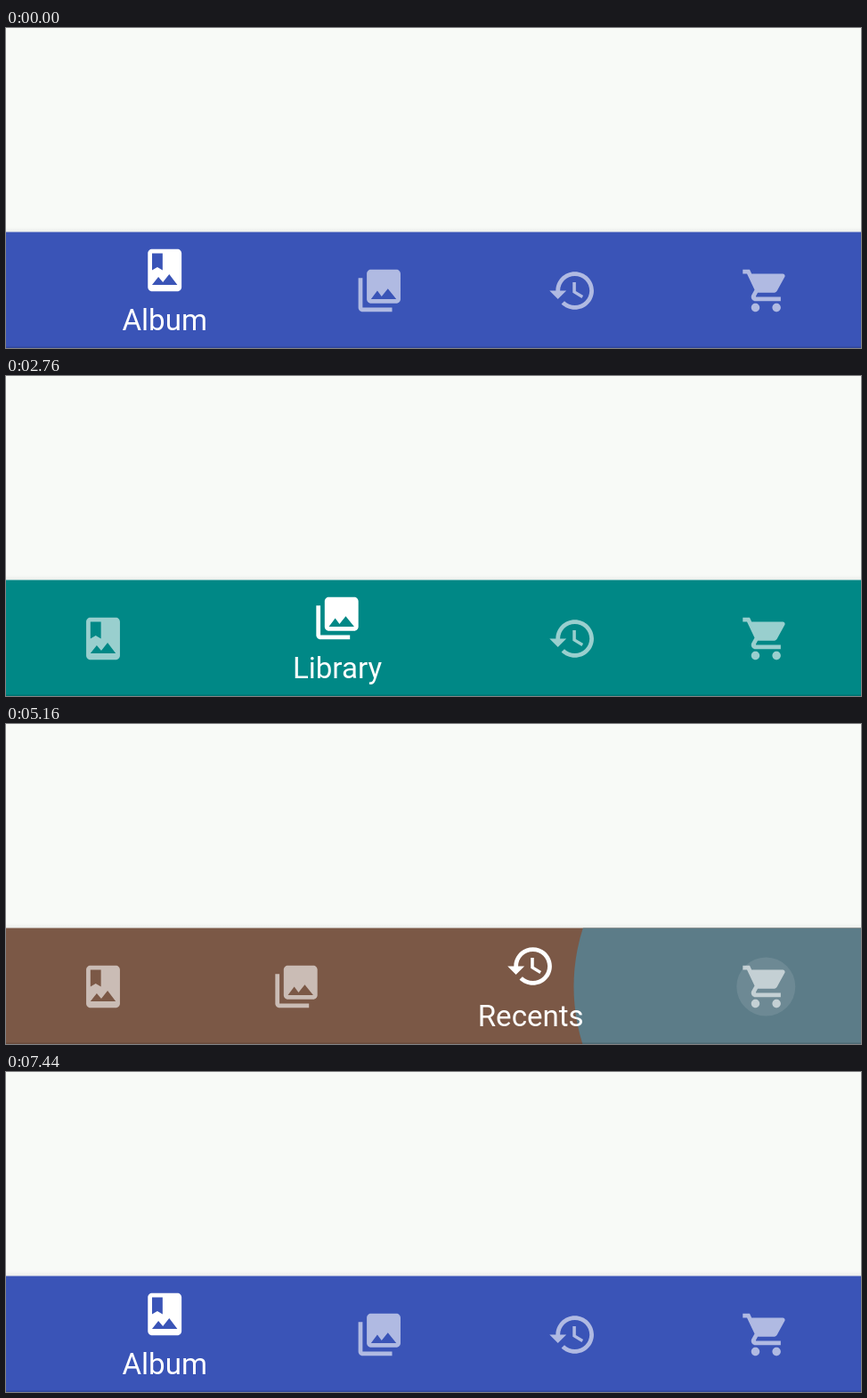
An HTML page that plays this animation: 960x360 px, repeating every 7500 ms.

```html
<!DOCTYPE html>
<html lang="en">
<head>
<meta charset="utf-8">
<title>Bottom navigation</title>
<style>
  html, body { margin: 0; width: 100%; height: 100%; overflow: hidden; background: #f8faf7; }
  svg { display: block; width: 960px; height: 360px; }
  text { font: 33.1px Roboto, Arial, sans-serif; fill: #fff; text-anchor: middle; }
</style>
</head>
<body>
<svg id="stage" viewBox="0 0 960 360">
  <defs>
    <linearGradient id="shade" x1="0" y1="0" x2="0" y2="1">
      <stop offset="0" stop-color="#000" stop-opacity="0"/>
      <stop offset="1" stop-color="#000" stop-opacity=".05"/>
    </linearGradient>
    <clipPath id="barClip"><rect y="229.5" width="960" height="131"/></clipPath>
  </defs>
  <rect width="960" height="360" fill="#f8faf7"/>
  <rect y="224" width="960" height="5.5" fill="url(#shade)"/>
  <g clip-path="url(#barClip)">
    <rect id="bar" y="229" width="960" height="131"/>
    <circle id="reveal" cy="295.5"/>
    <circle id="ripple" cy="295.5" fill="#fff"/>
    <rect y="358.5" width="960" height="1.5" opacity=".15"/>
    <g id="items"></g>
  </g>
</svg>
<script>
const LOOP = 7500;
const REST_Y = 295.5, ACTIVE_Y = 272.5, LABEL_Y = 340;
const ICON_SCALE = 2.367;
const REVEAL_MS = 500, FADE_MS = 108, MOVE_DELAY = 110, MOVE_MS = 380;

const tabs = [
  { label: 'Album', color: '#3a54b7', active: 178.2,
    icon: 'M18 2H6c-1.1 0-2 .9-2 2v16c0 1.1.9 2 2 2h12c1.1 0 2-.9 2-2V4c0-1.1-.9-2-2-2zM6 4h5v8l-2.5-1.5L6 12V4zm0 15l3-3.86 2.14 2.58 3-3.86L18 19H6z' },
  { label: 'Library', color: '#008886', active: 372,
    icon: 'M22 16V4c0-1.1-.9-2-2-2H8c-1.1 0-2 .9-2 2v12c0 1.1.9 2 2 2h12c1.1 0 2-.9 2-2zm-11-4l2.03 2.71L16 11l4 5H8l3-4zM2 6v14c0 1.1.9 2 2 2h14v-2H4V6H2z' },
  { label: 'Recents', color: '#7b5846', active: 589.2,
    icon: 'M13 3c-4.97 0-9 4.03-9 9H1l3.89 3.89.07.14L9 12H6c0-3.87 3.13-7 7-7s7 3.13 7 7-3.13 7-7 7c-1.93 0-3.68-.79-4.94-2.06l-1.42 1.42C8.27 19.99 10.51 21 13 21c4.97 0 9-4.03 9-9s-4.03-9-9-9zm-1 5v5l4.28 2.54.72-1.21-3.5-2.08V8H12z' },
  { label: 'Purchased', color: '#5c7c88', active: 782,
    icon: 'M7 18c-1.1 0-1.99.9-1.99 2S5.9 22 7 22s2-.9 2-2-.9-2-2-2zM1 2v2h2l3.6 7.59-1.35 2.45c-.16.28-.25.61-.25.96 0 1.1.9 2 2 2h12v-2H7.42c-.14 0-.25-.11-.25-.25l.03-.12.9-1.63h7.45c.75 0 1.41-.41 1.75-1.03l3.58-6.49c.08-.14.12-.31.12-.48 0-.55-.45-1-1-1H5.21l-.94-2H1zm16 16c-1.1 0-1.99.9-1.99 2s.89 2 1.99 2 2-.9 2-2-.9-2-2-2z' }
];

const taps = [
  { at: 1480, from: 0, to: 1 },
  { at: 3432, from: 1, to: 2 },
  { at: 5052, from: 2, to: 3 },
  { at: 6860, from: 3, to: 0 }
];
const idle = { at: -LOOP, from: 3, to: 0 };

const byId = id => document.getElementById(id);
const bar = byId('bar'), reveal = byId('reveal'), ripple = byId('ripple');
const clamp = v => Math.min(1, Math.max(0, v));
const ease = p => (1 - Math.cos(Math.PI * clamp(p))) / 2;
const mix = (a, b, p) => a + (b - a) * p;

function add(parent, tag, attrs = {}) {
  const el = document.createElementNS('http://www.w3.org/2000/svg', tag);
  set(el, attrs);
  return parent.appendChild(el);
}

function set(el, attrs) {
  for (const key in attrs) el.setAttribute(key, attrs[key]);
}

for (const tab of tabs) {
  tab.iconEl = add(byId('items'), 'path', { d: tab.icon, fill: '#fff' });
  tab.labelEl = add(byId('items'), 'text');
  tab.labelEl.textContent = tab.label;
}

// Centre of tab i while tab `selected` is the wide one.
function centre(i, selected) {
  if (i === selected) return tabs[i].active;
  return (i < selected ? 109 : 202.3) + 217 * i;
}

function drawReveal(tap, dt) {
  const x = centre(tap.to, tap.from);
  const done = dt >= REVEAL_MS;
  const full = Math.max(x, 960 - x) + 30;
  set(bar, { fill: tabs[done ? tap.to : tap.from].color });
  set(reveal, {
    cx: x,
    r: mix(131, full, ease(dt / REVEAL_MS)),
    fill: tabs[tap.to].color,
    opacity: done ? 0 : clamp(dt / FADE_MS)
  });
  set(ripple, {
    cx: x,
    r: 33 * clamp((dt - 48) / 60),
    opacity: 0.1 * (1 - clamp((dt - 150) / 200))
  });
}

function drawTab(tab, i, tap, p) {
  const x = mix(centre(i, tap.from), centre(i, tap.to), p);
  const on = i === tap.to ? p : i === tap.from ? 1 - p : 0;
  const y = mix(REST_Y, ACTIVE_Y, on);
  set(tab.iconEl, {
    transform: `translate(${x} ${y}) scale(${ICON_SCALE}) translate(-12 -12)`,
    opacity: mix(0.6, 1, on)
  });
  set(tab.labelEl, {
    transform: `translate(${x} ${LABEL_Y + (1 - on) * 14}) scale(${mix(0.5, 1, on)})`,
    opacity: on
  });
}

function draw(t) {
  const tap = taps.filter(k => k.at <= t).pop() || idle;
  const dt = t - tap.at;
  const p = ease((dt - MOVE_DELAY) / MOVE_MS);
  drawReveal(tap, dt);
  tabs.forEach((tab, i) => drawTab(tab, i, tap, p));
}

const start = performance.now();
function tick() {
  draw((performance.now() - start) % LOOP);
  requestAnimationFrame(tick);
}
tick();
</script>
</body>
</html>
```
